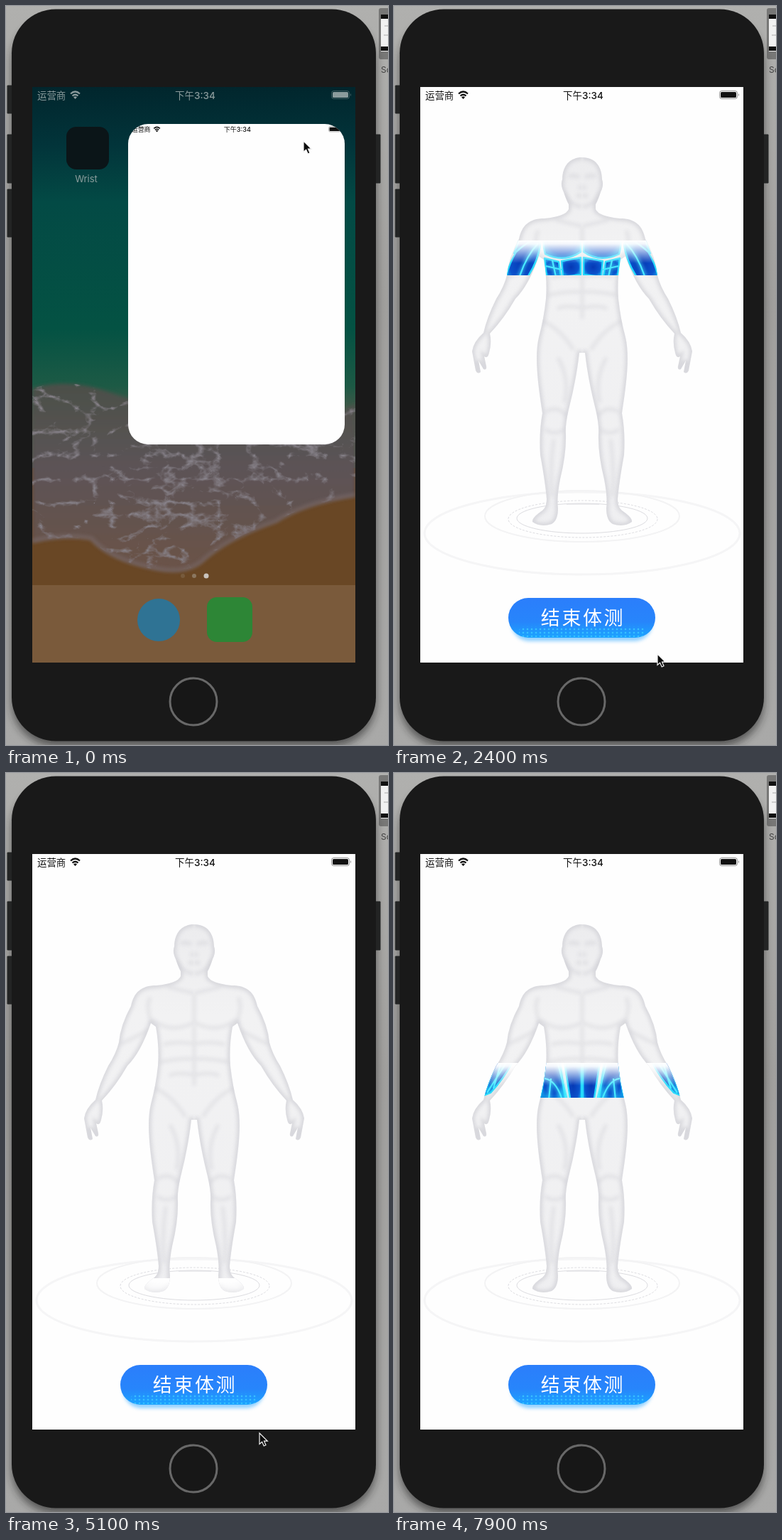
Recreate the animation shown at these times as an HTML page. Size 538x1040 px, loop 8 s.

```html
<!DOCTYPE html>
<html lang="zh">
<head>
<meta charset="utf-8">
<style>
html, body { margin: 0; width: 100%; height: 100%; overflow: hidden; background: #a6a6a4 }
svg { display: block; width: 538px; height: 1040px }
text { font-family: Inter, "Noto Sans CJK SC", "Noto Sans CJK", sans-serif }
</style>
</head>
<body>
<svg viewBox="0 0 538 1040">
<defs>
  <linearGradient id="desk" x2="0" y2="1">
    <stop stop-color="#b0b0ae"/><stop offset=".4" stop-color="#a09f9d"/><stop offset="1" stop-color="#a9a9a8"/>
  </linearGradient>
  <linearGradient id="sea" x2="0" y2="1">
    <stop stop-color="#01262d"/><stop offset=".1" stop-color="#02343a"/><stop offset=".2" stop-color="#034a45"/>
    <stop offset=".42" stop-color="#045243"/><stop offset=".52" stop-color="#1d5a45"/><stop offset=".57" stop-color="#4c5749"/>
  </linearGradient>
  <linearGradient id="foam" x2="0" y2="1">
    <stop stop-color="#4b5049"/><stop offset=".45" stop-color="#5c5356"/><stop offset="1" stop-color="#6b5347"/>
  </linearGradient>
  <linearGradient id="btn" x2="0" y2="1">
    <stop stop-color="#2b7efb"/><stop offset=".6" stop-color="#2785fb"/><stop offset="1" stop-color="#1ba4ff"/>
  </linearGradient>
  <linearGradient id="fade" x2="0" y2="1">
    <stop stop-color="#fff"/><stop offset=".1" stop-color="#fff" stop-opacity=".95"/>
    <stop offset=".65" stop-color="#fff" stop-opacity="0"/>
  </linearGradient>
  <linearGradient id="skin" x2="0" y2="1">
    <stop stop-color="#ececee"/><stop offset=".25" stop-color="#f2f2f3"/><stop offset="1" stop-color="#efeff1"/>
  </linearGradient>
  <radialGradient id="flesh">
    <stop stop-color="#0638b4"/><stop offset=".75" stop-color="#0a52cc"/><stop offset="1" stop-color="#0f8ee4"/>
  </radialGradient>
  <pattern id="dots" width="6" height="5" patternUnits="userSpaceOnUse"><circle cx="2" cy="2" r="1.3" fill="#3ccaff"/></pattern>
  <filter id="soft" x="-30%" y="-30%" width="160%" height="160%"><feGaussianBlur stdDeviation="2.5"/></filter>
  <filter id="wide" x="-30%" y="-30%" width="160%" height="160%"><feGaussianBlur stdDeviation="6"/></filter>
  <filter id="lace" x="0" y="0" width="100%" height="100%" color-interpolation-filters="sRGB">
    <feTurbulence type="turbulence" baseFrequency=".02 .03" numOctaves="4" seed="5"/>
    <feColorMatrix values="0 0 0 0 .53  0 0 0 0 .51  0 0 0 0 .54  -5 0 0 0 1.15"/>
    <feComposite operator="in" in2="SourceAlpha"/>
  </filter>

  <path id="half" d="M265 213C246 213 237 227 237 244Q234 252 239 262Q243 274 246 279V286Q242 296 212 299C190 299 180 309 176 328Q161 355 159 379Q155 395 144 412Q131 438 126 460Q112 472 110 486L115 513Q118 519 122 515L119 499L126 511Q131 513 130 507L127 493Q132 497 134 488Q138 474 135 461Q155 440 171 412Q190 393 204 352L211 357Q216 385 214 412Q211 440 204 466C197 495 204 540 209 573Q204 600 206 632Q213 670 215 694Q215 705 209 710Q194 720 195 726Q206 734 222 729Q231 724 231 707Q229 692 234 666Q243 630 242 602Q241 590 246 568Q257 525 261 488H265"/>
  <clipPath id="halfClip"><use href="#half"/></clipPath>
  <clipPath id="bandClip"><rect class="band" x="37" width="455" height="49"/></clipPath>
  <clipPath id="winClip"><rect id="win"/></clipPath>
  <clipPath id="screenClip"><rect x="37" y="114" width="455" height="810"/></clipPath>
  <path id="surf" d="M37 538Q90 522 150 545T280 560T390 575T492 560V690Q420 700 380 726Q310 750 275 783Q250 803 200 791Q140 776 120 750Q80 745 37 755Z"/>

  <g id="side">
    <use href="#half" fill="url(#skin)"/>
    <g clip-path="url(#halfClip)" fill="none" stroke="#cbcbd1">
      <use href="#half" stroke-width="7" filter="url(#soft)" opacity=".65"/>
      <g filter="url(#soft)" stroke-width="4" opacity=".42">
        <path d="M265 310L228 301M206 347Q232 368 265 351V312M265 355V440M265 381Q240 377 222 382M265 402Q235 402 217 407M265 425Q240 420 230 426M209 443Q235 455 253 484M206 352Q196 330 203 316M162 381Q182 372 198 363M214 571Q231 561 243 577M213 596Q227 605 239 596M231 495Q248 525 240 558M225 610Q219 650 223 690"/>
        <path d="M246 240Q253 237 261 241M265 257L260 254M265 267H257M240 264Q249 282 265 282" stroke-width="5"/>
      </g>
    </g>
  </g>
  <g id="muscle" clip-path="url(#halfClip)">
    <g fill="url(#flesh)" stroke="#25d9fb" stroke-width="2.4" stroke-linejoin="round">
      <path d="M264 281L247 279Q247 290 233 297L212 304L264 306Z"/>
      <path d="M213 304Q184 302 177 328L169 348Q190 345 207 322Z"/>
      <path d="M172 346Q203 318 206 336Q203 360 185 386L156 394Q158 370 172 346Z"/>
      <path d="M216 308L263 312V346Q240 362 213 349Q207 330 216 308Z"/>
      <path d="M236 359L263 354V378L238 381Z"/><path d="M212 355L232 360L235 381L215 380Z"/>
      <path d="M237 385L263 382V402L239 404Z"/>
      <path d="M214 385L231 384L241 460L204 462Q214 430 214 385Z"/>
      <path d="M240 407H264V470L249 464Z"/>
      <path d="M146 402L172 396Q160 424 136 450L126 454Z"/>
      <path d="M203 462L257 476Q256 540 244 576L210 570Q198 510 203 462Z"/>
      <path d="M209 588L242 596Q240 640 230 682L217 688L206 640Z"/>
    </g>
    <g fill="none" stroke="#49eaff" stroke-width="2.2">
      <path id="veins" d="M251 280L263 304M247 286L242 304M243 292L226 304M203 334Q184 354 174 390M214 366L236 371M223 358L228 381M212 430Q228 432 237 460M221 430L218 460M226 390L244 460M163 400L131 450M152 404L140 444M222 463Q213 490 222 572M246 466Q230 505 238 574"/>
      <path d="M222 592Q216 640 222 686M232 594Q236 640 226 682"/>
      <use href="#veins" stroke-width="5" opacity=".6" filter="url(#soft)"/>
    </g>
    <rect class="band" x="108" width="157" height="49" fill="url(#fade)"/>
  </g>

  <g id="status">
    <text x="44" y="130.500" font-size="13.400">运营商</text>
    <g fill="none" stroke="currentColor" stroke-width="2.200"><path d="M91 123.500Q97.500 117.500 104 123.500M93.500 126.500Q97.500 123 101.500 126.500"/></g>
    <path d="M95 128.300Q97.500 126 100 128.300L97.500 131Z"/>
    <text x="266.500" y="130.500" font-size="13.500" font-weight="500" text-anchor="middle">下午3:34</text>
    <rect x="458.500" y="119.500" width="25" height="11" rx="3" fill="none" stroke="currentColor" stroke-opacity=".45"/>
    <rect x="460" y="121" width="22" height="8" rx="1.500"/><path d="M485 123Q487 125 485 127Z" opacity=".5"/>
  </g>
</defs>

<rect width="538" height="1040" fill="url(#desk)"/>
<g>
  <rect x="525" y="3" width="20" height="72" rx="3" fill="#777776"/>
  <rect x="528" y="14" width="12" height="50" fill="#f1f1f1"/><path d="M528 15h12M528 60h12" stroke="#111" stroke-width="6"/>
  <path d="M533 28h6M532 41h6" stroke="#aaa"/>
  <text x="528" y="94" font-size="12" fill="#444">Sc</text>
</g>
<rect x="8" y="18" width="513" height="1024" rx="62" fill="#222" opacity=".6" filter="url(#wide)"/>
<path d="M2 112h8v39h-8zM2 181h8v68h-8zM2 258h8v67h-8zM519 181h8v68h-8z" fill="#232424" stroke="#232424" stroke-linejoin="round"/>
<rect x="8" y="4.500" width="513" height="1030" rx="62" fill="#191919"/>
<circle cx="264" cy="979" r="33" fill="#171717" stroke="#686868" stroke-width="3"/>

<g id="home" clip-path="url(#screenClip)">
  <rect x="37" y="114" width="455" height="810" fill="url(#sea)"/>
  <path d="M37 650H492V924H37Z" fill="#694725"/>
  <use href="#surf" fill="url(#foam)" filter="url(#soft)"/>
  <use href="#surf" filter="url(#lace)"/>
  <path d="M37 753Q80 742 120 749Q145 778 205 790Q250 801 275 782Q310 749 380 725Q420 699 492 688" fill="none" stroke="#77696b" stroke-width="5" opacity=".8" filter="url(#soft)"/>
  <rect x="37" y="815" width="455" height="109" fill="#7a5a3b"/>
  <rect x="85" y="170" width="60" height="60" rx="14" fill="#0b1518"/>
  <text x="113" y="248" font-size="13" text-anchor="middle" fill="#8d9f9e">Wrist</text>
  <circle cx="215" cy="864" r="30" fill="#2f7394"/>
  <rect x="283" y="832" width="64" height="63" rx="14" fill="#2d8636"/>
  <g fill="#8b7760"><circle cx="249" cy="802" r="3" opacity=".4"/><circle cx="265" cy="802" r="3"/><circle cx="282" cy="802" r="3.500" fill="#c9c3bd"/></g>
  <use href="#status" fill="#8b9b9c" color="#8b9b9c"/>
</g>

<g clip-path="url(#winClip)">
  <g id="app">
    <rect x="37" y="114" width="455" height="810" fill="#fefefe"/>
    <use href="#status" fill="#111" color="#111"/>
    <g id="content">
      <g fill="none" stroke="#dcdce0">
        <ellipse cx="265" cy="742" rx="222" ry="58" stroke="#f5f5f6" stroke-width="3"/>
        <ellipse cx="265" cy="718" rx="137" ry="36" stroke="#f3f3f4" stroke-width="2"/>
        <ellipse cx="266" cy="722" rx="105" ry="26" stroke-dasharray="3 2"/>
        <ellipse cx="265" cy="721" rx="92" ry="21"/>
        <path d="M243 701H289"/>
      </g>
      <use href="#side"/><use href="#side" transform="matrix(-1 0 0 1 530 0)"/>
      <g id="scan" clip-path="url(#bandClip)">
        <use href="#muscle"/><use href="#muscle" transform="matrix(-1 0 0 1 530 0)"/>
      </g>
      <rect x="165" y="842" width="199" height="52" rx="26" fill="#4db4ff" opacity=".6" filter="url(#soft)"/>
      <rect x="161" y="833" width="207" height="56" rx="28" fill="url(#btn)"/>
      <rect x="176" y="873" width="177" height="15" rx="7" fill="url(#dots)" opacity=".8"/>
      <text x="266" y="871" font-size="27" letter-spacing="2.600" font-weight="500" text-anchor="middle" fill="#fff">结束体测</text>
    </g>
  </g>
</g>
<path id="cursor" d="M0 0V15.500L3.600 12.200L6.200 18L9 16.800L6.500 11.200H11.300Z" fill="#0b0b0b" stroke="#f4f4f4" stroke-width="1.200"/>
</svg>
<script>
const $ = id => document.getElementById(id);
const set = (el, attrs) => { for (const k in attrs) el.setAttribute(k, attrs[k]); };
const mix = (a, b, p) => a + (b - a) * p;
const clamp = p => Math.max(0, Math.min(1, p));
const show = on => on ? 'visible' : 'hidden';

// keys: rows of [time, value, ...]
function track(keys, t, col = 1) {
  const i = keys.findIndex(k => k[0] > t);
  if (i < 0) return keys[keys.length - 1][col];
  if (!i) return keys[0][col];
  const a = keys[i - 1], b = keys[i];
  return mix(a[col], b[col], (t - a[0]) / (b[0] - a[0]));
}

const scanKeys = [[1000, 190], [1700, 250], [2400, 330], [2900, 408], [3200, 461], [5100, 711], [6000, 756]];
const cursorKeys = [[1000, 419, 190], [1800, 390, 880], [2400, 371, 912], [2800, 363, 944],
  [4600, 362, 944], [5000, 357, 929]];
const bands = document.querySelectorAll('.band');

function draw(now) {
  const t = Math.floor(now % 8000 / 100) * 100; // ten pictures a second
  const open = 1 - (1 - clamp(t / 300)) ** 3;
  const x = mix(172, 37, open), y = mix(166, 114, open), w = mix(305, 455, open);
  set($('win'), { x, y, width: w, height: mix(451, 810, open), rx: 28 * (1 - open) });
  set($('app'), { transform: `translate(${x} ${y}) scale(${w / 455}) translate(-37 -114)` });
  set($('home'), { visibility: show(open < 1) });
  set($('content'), { opacity: clamp((t - 400) / 550) });

  const top = track(scanKeys, t < 6000 ? t : t - 5000);
  bands.forEach(b => set(b, { y: top }));
  set($('scan'), { visibility: show(t >= 1000) });

  set($('cursor'), {
    transform: `translate(${track(cursorKeys, t)} ${track(cursorKeys, t, 2)})`,
    visibility: show(t < 5800)
  });
}
const start = performance.now();
function tick() {
  draw(performance.now() - start);
  requestAnimationFrame(tick);
}
tick();
</script>
</body>
</html>
```
